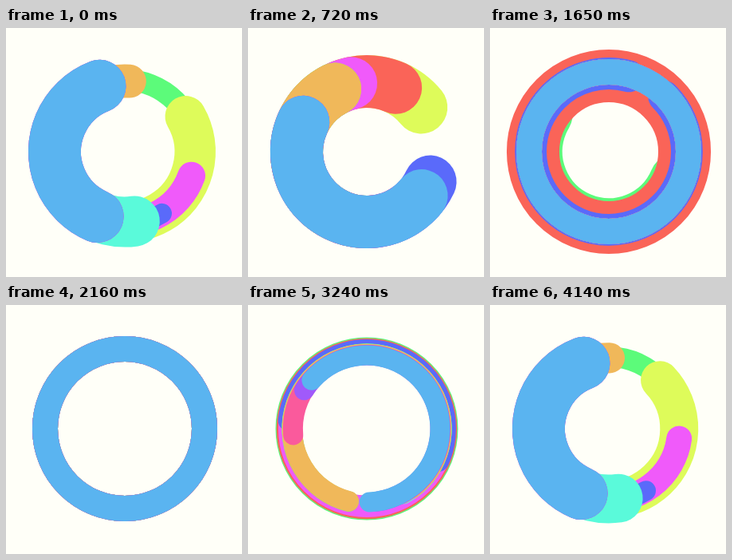
These frames come from a looping animation (296x312 px, 4.17 s). An HTML page with a canvas:

```html
<!DOCTYPE html>
<html lang="en">
<head>
<meta charset="utf-8">
<title>Chasing arcs</title>
<style>
  html, body { margin: 0; width: 100%; height: 100%; overflow: hidden; background: #fffff8; }
  canvas { display: block; }
</style>
</head>
<body>
<canvas id="stage" width="296" height="312"></canvas>
<script>
const LOOP = 4170, STEP = 30, CX = 149, CY = 155;
const ctx = document.getElementById('stage').getContext('2d');
const RAD = Math.PI / 180;

// Eased 0..1 step between two times.
function ramp(t, start, end) {
  const u = Math.min(1, Math.max(0, (t - start) / (end - start)));
  return u * u * (3 - 2 * u);
}

// Repeats a motion every loop, gaining `turn` each lap.
const looped = (motion, turn = 0) => t => {
  const lap = Math.floor(t / LOOP);
  return motion(t - lap * LOOP) + lap * turn;
};

// One shared motion; angles in degrees, clockwise from the right.
const tailAngle = looped(t => 113 - 158 * ramp(t, 0, 1500) + 518 * ramp(t, 2430, 4020), 360);
const headAngle = looped(t => 249 - 44 * ramp(t, 0, 600) + 130 * ramp(t, 720, 1500)
  + 274 * ramp(t, 2600, 4050), 360);
const thickness = looped(t => 66 - 34 * ramp(t, 1130, 1260) - 7 * ramp(t, 2160, 3240)
  + 41 * ramp(t, 3400, 3900));
const radius = looped(t => 88 + 12 * ramp(t, 720, 1400) - 12 * ramp(t, 2350, 3800));

// Bottom to top. lag delays the turning, slow the swelling (late adds to it
// near the loop's seam); head and tail shift the two ends.
const arcs = [
  { color: '#5cfb7a', lag: 830, slow: 700 },
  { color: '#defb5a', lag: 700, slow: 470, head: 72 },
  { color: '#fa6458', lag: 450, slow: 550, late: 220, head: 64 },
  { color: '#f05afa', lag: 580, slow: 400, late: 210, head: 14 },
  { color: '#5a6afa', lag: 50, slow: 430, late: 340, head: -50, tail: -54 },
  { color: '#84fb5a', lag: 260, slow: 55, late: 530, head: 32, tail: 30 },
  { color: '#5afada', lag: 100, slow: 95, late: 255, tail: -31 },
  { color: '#f0b85a', lag: 260, slow: 35, late: 515, head: 32, tail: 30 },
  { color: '#fa5a9c', lag: 95, slow: 15, late: 200 },
  { color: '#a05afa', lag: 20, slow: 10 },
  { color: '#5ab4f0', lag: 0, slow: 0 }
];

function drawArc(t, { color, lag, slow, late = 0, head = 0, tail = 0 }) {
  const seam = Math.cos(Math.PI * t / LOOP) ** 6;
  const from = tailAngle(t - lag) + tail * seam;
  const to = headAngle(t - lag) + head;
  const swell = t - slow - late * seam;
  const full = to - from >= 360;
  ctx.beginPath();
  ctx.arc(CX, CY, radius(swell), full ? 0 : from * RAD, full ? 2 * Math.PI : to * RAD);
  ctx.strokeStyle = color;
  ctx.lineWidth = thickness(swell);
  ctx.stroke();
}

function draw(t) {
  ctx.fillStyle = '#fffff8';
  ctx.fillRect(0, 0, 296, 312);
  ctx.lineCap = 'round';
  for (const arc of arcs) drawArc(t, arc);
}

const start = performance.now();
function tick() {
  const t = (performance.now() - start) % LOOP;
  draw(Math.floor(t / STEP) * STEP);
  requestAnimationFrame(tick);
}
tick();
</script>
</body>
</html>
```
